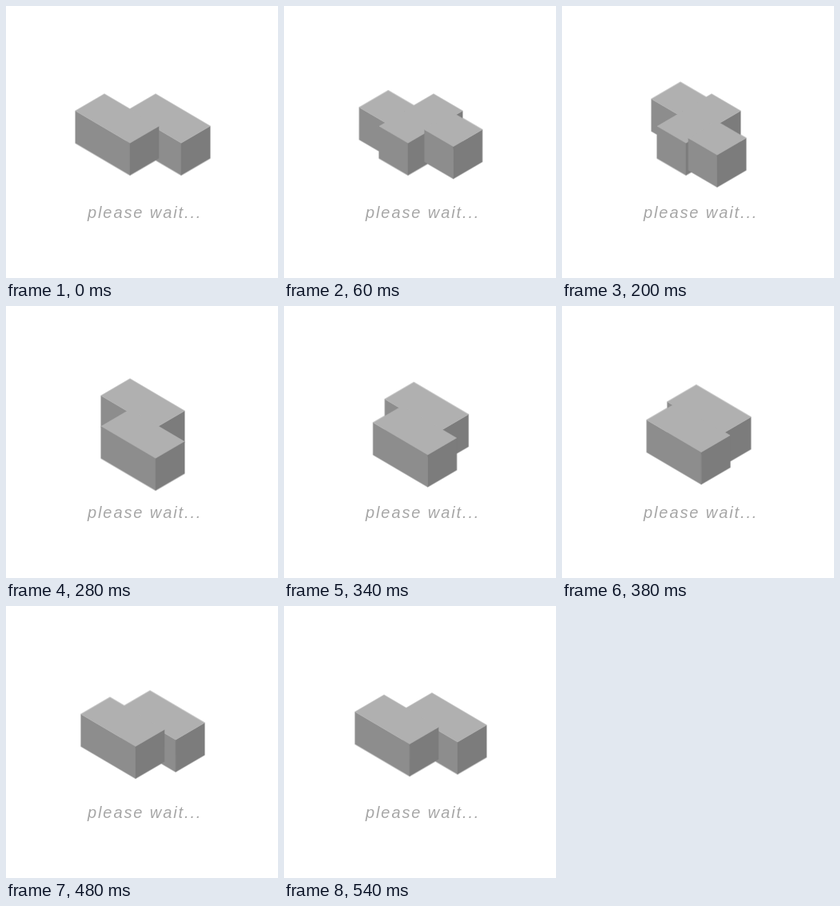
These frames come from a looping animation (340x340 px, 0.56 s). An HTML page with a canvas:

```html
<!DOCTYPE html>
<html lang="en">
<head>
<meta charset="utf-8">
<title>Please wait</title>
<style>
  html, body { margin: 0; width: 100%; height: 100%; overflow: hidden; background: #fff; }
  canvas { position: absolute; left: 0; top: 0; }
  p {
    position: absolute; left: 102px; top: 247px; margin: 0;
    font: italic 20px/23px "Liberation Sans", Arial, sans-serif;
    letter-spacing: 1.9px; white-space: nowrap; color: #a6a6a6;
  }
</style>
</head>
<body>
<canvas width="340" height="340"></canvas>
<p>please wait...</p>
<script>
const ctx = document.querySelector('canvas').getContext('2d');
const LOOP = 560, HALF = LOOP / 2, STEP = 20;
const EDGE = [36, 21], PITCH = [32, 19], HEIGHT = 40;
const ORIGIN = [119, 150.3];

// Slides quickest just past the middle
const ease = t => t + 0.085 * Math.sin(Math.PI * t ** 1.3) ** 2;

function trace(points) {
  ctx.beginPath();
  points.forEach(([x, y]) => ctx.lineTo(x, y));
  ctx.closePath();
}

function face(color, points) {
  trace(points);
  ctx.fillStyle = ctx.strokeStyle = color;
  ctx.lineWidth = 0.5;
  ctx.fill();
  ctx.stroke();
}

// u runs down-right, v runs up-right, both in grid cells; len is the block's length along u
function block(u, v, len = 1) {
  const [ex, ey] = EDGE, [px, py] = PITCH;
  const w = ex + (len - 1) * px, h = ey + (len - 1) * py;
  const x = ORIGIN[0] + (u + v) * px, y = ORIGIN[1] + (u - v) * py;
  const left = [x, y], front = [x + w, y + h];
  const back = [x + ex, y - ey], right = [x + w + ex, y + h - ey];
  const low = ([a, b]) => [a, b + HEIGHT];
  return {
    outline: [left, back, right, low(right), low(front), low(left)],
    top: [left, back, right, front],
    leftSide: [left, front, low(front), low(left)],
    rightSide: [front, right, low(right), low(front)]
  };
}

function paint(blocks) {
  ctx.clearRect(0, 0, 340, 340);
  ctx.strokeStyle = '#d6d6d6';
  ctx.lineWidth = 2;
  ctx.lineJoin = 'round';
  for (const b of blocks) {
    trace(b.outline);
    ctx.stroke();
  }
  for (const b of blocks) {
    face('#8d8d8d', b.leftSide);
    face('#7c7c7c', b.rightSide);
    face('#b0b0b0', b.top);
  }
}

function draw(now) {
  const t = Math.floor(now % LOOP / STEP) * STEP;
  if (t > 0 && t < HALF) {
    // The two outer cubes pass the fixed centre pair
    const d = ease(t / HALF);
    paint([block(-1, d), block(0, 1), block(0, 0), block(1, 1 - d)]);
  } else {
    // The two bars slide along each other
    const d = t ? ease((t - HALF) / HALF) : 1;
    paint([block(d - 1, 1, 2), block(-d, 0, 2)]);
  }
}

const start = performance.now();
function tick() {
  draw(performance.now() - start);
  requestAnimationFrame(tick);
}
tick();
</script>
</body>
</html>
```
